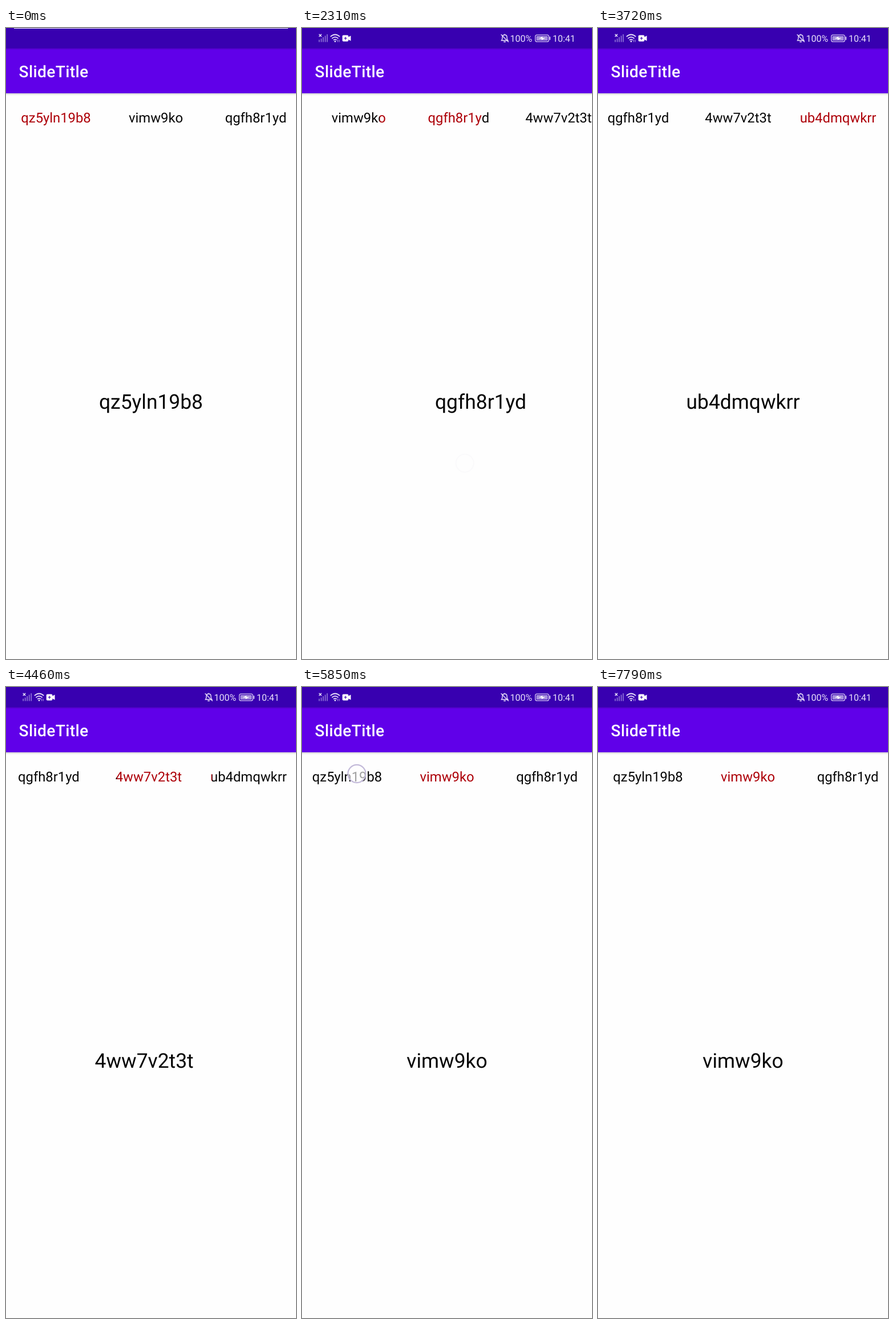
These frames come from a looping animation (508x1102 px, 8 s). An HTML page:

```html
<!DOCTYPE html>
<html lang="en">
<head>
<meta charset="utf-8">
<title>SlideTitle</title>
<style>
  html, body { margin: 0; width: 100%; height: 100%; overflow: hidden; background: #fefefe; }
  svg { display: block; width: 508px; height: 1102px; }
  text { font-family: Roboto, sans-serif; text-rendering: geometricPrecision; }
  .tab { font-size: 23.8px; text-anchor: middle; }
  .page { font-size: 35.4px; text-anchor: middle; fill: #050505; }
  .status { font-size: 16px; fill: #eae2fa; }
  .title { font-size: 28.2px; font-weight: 500; letter-spacing: .35px; fill: #fff; }
</style>
</head>
<body>
<svg viewBox="0 0 508 1102">
  <defs>
    <linearGradient id="shade" x2="0" y2="1">
      <stop stop-color="#000" stop-opacity=".17"/>
      <stop offset="1" stop-color="#000" stop-opacity="0"/>
    </linearGradient>
  </defs>
  <rect width="508" height="1102" fill="#fefefe"/>
  <g id="pages"></g>
  <g id="tabs"></g>

  <rect y="114" width="508" height="4" fill="url(#shade)"/>
  <rect y="35" width="508" height="79" fill="#6000e9"/>
  <rect width="508" height="35.5" fill="#3800b0"/>
  <rect y="35.5" width="508" height="3" fill="url(#shade)"/>
  <text class="title" x="22.5" y="85.5">SlideTitle</text>
  <rect id="panelEdge" x="14" width="480" height="1" fill="#fff"/>

  <g id="status">
    <path d="M29.8 10.8l4.4 4.4m0-4.4l-4.4 4.4" stroke="#eae2fa" stroke-width="1.5"/>
    <path d="M30.2 24.5v-4M33.7 24.5v-6M37.2 24.5v-8.5M40.7 24.5v-11M44.2 24.5v-13.5"
      stroke="#8f74d6" stroke-width="1.7"/>
    <g fill="none" stroke="#eae2fa" stroke-width="1.7">
      <path d="M49.8 15.2q8.2-7.4 16.4 0M52.4 18.3q5.6-5 11.2 0M55 21.2q3-2.6 6 0"/>
      <path d="M62.6 24.5v-4M65.2 20.5v4" stroke-width="1" opacity=".7"/>
    </g>
    <circle cx="58" cy="23.4" r="1.4" fill="#eae2fa"/>
    <path d="M72.5 12.5h7q1.8 0 1.8 1.8v1.4l4.2-2.2v9l-4.2-2.2v1.4q0 1.8-1.8 1.8h-7q-1.8 0-1.8-1.8v-7.4q0-1.8 1.8-1.8z"
      fill="#fff"/>
    <path d="M76.2 15.5v5M73.7 18h5" stroke="#3800b0" stroke-width="1.2"/>

    <g fill="none" stroke="#eae2fa" stroke-width="1.4">
      <path d="M349.5 21.8h11.2q-1.6-1.8-1.6-4.2v-1.2q0-4.4-4.1-4.4t-4.1 4.4v1.2q0 2.4-1.4 4.2zM355 12v-1.6M353.2 24.3h3.6"/>
      <path d="M348.6 11.2l13.2 13.2"/>
    </g>
    <text class="status" x="364.5" y="23.8">100%</text>
    <rect x="408.6" y="12.1" width="23.8" height="11.8" rx="3" fill="none" stroke="#d8ccf3" stroke-width="1.2"/>
    <rect x="410.4" y="13.9" width="20.2" height="8.2" rx="1.5" fill="#a58edd"/>
    <path d="M414.5 18.6l6.8-3.6v2.4h5.2l-6.8 3.7v-2.5z" fill="#fff"/>
    <rect x="433.4" y="15" width="1.8" height="6" rx=".9" fill="#d8ccf3"/>
    <text class="status" x="439" y="23.8">10:41</text>
  </g>

  <circle id="touch" r="15.6" fill="#fff" fill-opacity=".62" stroke="#c3bad9" stroke-width="2.2"/>
</svg>
<script>
const LOOP = 8000, WIDTH = 508, TAB_GAP = 175, TAB_CENTER = 87.5;
const MAX_SCROLL = 5 * TAB_GAP - WIDTH;
const BLACK = "#050505", RED = "#ad0008";
const names = ["qz5yln19b8", "vimw9ko", "qgfh8r1yd", "4ww7v2t3t", "ub4dmqwkrr"];

// Swipe timing in ms after the finger lands
const GRAB = 60, RELEASE = 200, SETTLED = 500, FADED = 340, DRAGGED = .35;
const swipes = [
  { start: 1070, dir: 1, y: 797 },
  { start: 1980, dir: 1, y: 760 },
  { start: 2704, dir: 1, y: 771 },
  { start: 3220, dir: 1, y: 734 },
  { start: 4060, dir: -1, y: 788 },
  { start: 4507, dir: -1, y: 786 },
  { start: 4975, dir: -1, y: 783 }
];
const STRIP_DRAG = { start: 5840, lift: 6150, end: 6320, x: 96, y: 151.5, travel: 130 };

const $ = id => document.getElementById(id);
const clamp = (v, lo = 0, hi = 1) => Math.min(hi, Math.max(lo, v));
const ramp = (t, from, to) => clamp((t - from) / (to - from));

function add(parent, tag, attrs, text = "") {
  const node = document.createElementNS("http://www.w3.org/2000/svg", tag);
  set(node, attrs);
  node.textContent = text;
  return parent.appendChild(node);
}
function set(node, attrs) {
  for (const key in attrs) node.setAttribute(key, attrs[key]);
}

const pages = names.map(name => add($("pages"), "text", { class: "page", y: 665 }, name));
const tabs = names.map((name, i) => {
  const gradient = add(document.querySelector("defs"), "linearGradient", { id: "ink" + i });
  const stops = [BLACK, RED, RED, BLACK].map(color => add(gradient, "stop", { "stop-color": color }));
  const label = add($("tabs"), "text", { class: "tab", y: 165, fill: `url(#ink${i})` }, name);
  return { label, stops };
});

const dragAmount = age => {
  const u = ramp(age, GRAB, RELEASE);
  return DRAGGED * u * (.4 + .6 * u);
};

function swipeProgress(age) {
  if (age < RELEASE) return dragAmount(age);
  return 1 - (1 - DRAGGED) * (1 - ramp(age, RELEASE, SETTLED)) ** 3;
}

const stripFinger = t => {
  const u = ramp(t, STRIP_DRAG.start + 20, STRIP_DRAG.lift);
  return STRIP_DRAG.travel * u * u * (3 - 2 * u);
};

function touchAt(t) {
  const swipe = swipes.find(s => t >= s.start && t < s.start + FADED);
  if (swipe) {
    const age = t - swipe.start;
    const moved = 11 * ramp(age, 20, GRAB) + WIDTH * dragAmount(age);
    const x = swipe.dir > 0 ? 474 - moved : 90 + moved;
    return { cx: x, cy: swipe.y, opacity: 1 - ramp(age, RELEASE - 20, FADED) };
  }
  if (t >= STRIP_DRAG.start && t < STRIP_DRAG.end) {
    return {
      cx: STRIP_DRAG.x + stripFinger(t), cy: STRIP_DRAG.y,
      opacity: 1 - ramp(t, STRIP_DRAG.lift, STRIP_DRAG.end)
    };
  }
  return { opacity: 0 };
}

function draw(t) {
  const position = swipes.reduce((sum, s) => sum + s.dir * swipeProgress(t - s.start), 0);
  const pulled = Math.max(0, stripFinger(t) - 11);
  const scroll = clamp(TAB_CENTER + TAB_GAP * position - WIDTH / 2 - pulled, 0, MAX_SCROLL);

  pages.forEach((page, i) => set(page, { x: WIDTH * (i - position + .5) }));
  tabs.forEach(({ label, stops }, i) => {
    set(label, { x: TAB_CENTER + TAB_GAP * i - scroll });
    const from = clamp(position - i), to = clamp(position - i + 1);
    [from, from, to, to].forEach((offset, k) => set(stops[k], { offset }));
  });

  set($("panelEdge"), { opacity: t < 30 ? 1 : 0 });
  set($("status"), { opacity: ramp(t, 60, 380) });
  set($("touch"), touchAt(t));
}

const began = performance.now();
function tick() {
  draw((performance.now() - began) % LOOP);
  requestAnimationFrame(tick);
}
tick();
</script>
</body>
</html>
```
